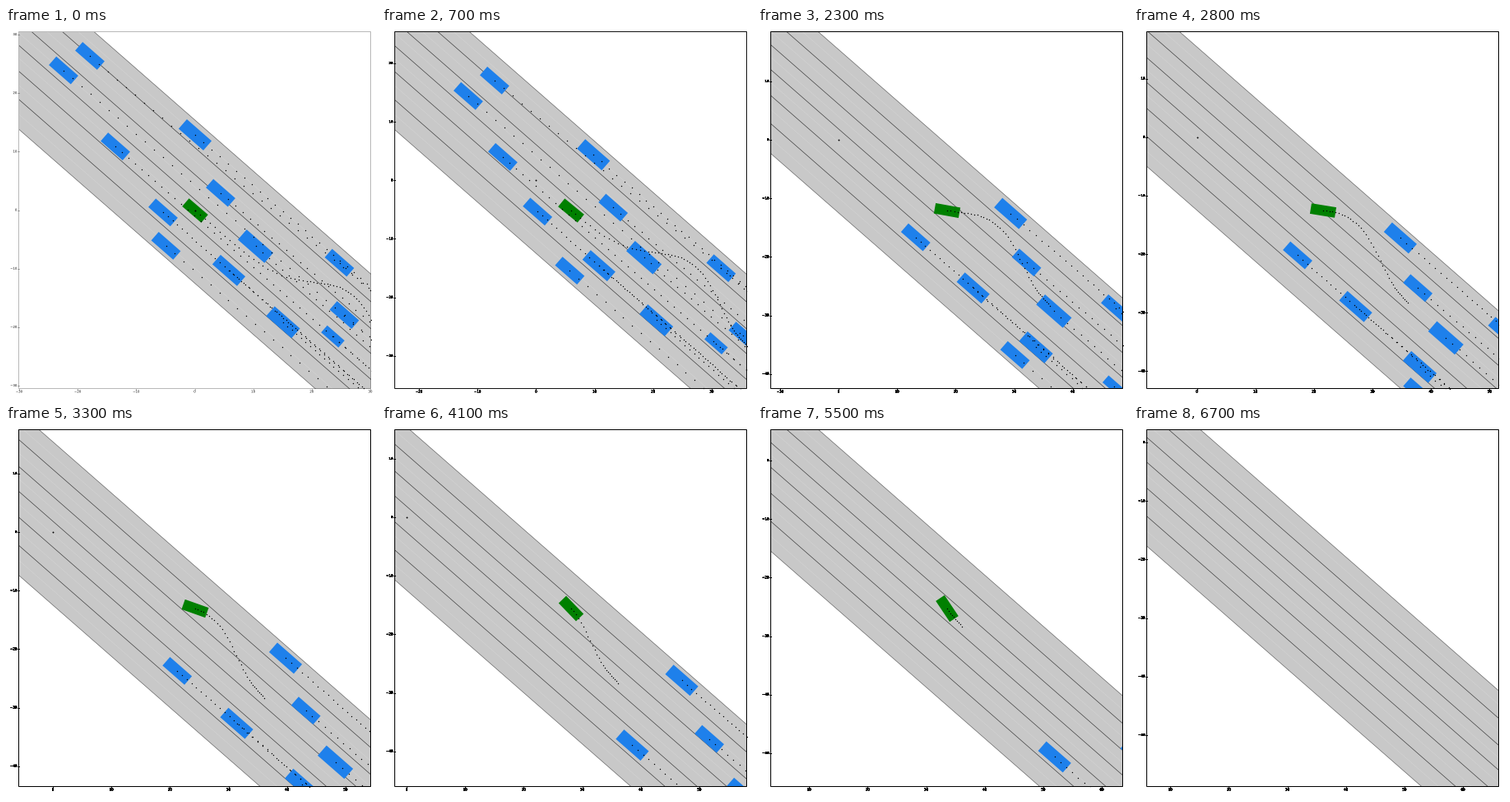
Recreate the animation shown at these times as a matplotlib script. Size 450x450 px, loop 7.2 s.

```python
import numpy as np
import matplotlib.pyplot as plt
import matplotlib.patheffects as pe
from matplotlib.animation import FuncAnimation
from matplotlib.patches import Polygon, Rectangle

SIZE, DPI = 450, 72          # one point equals one pixel
LEFT, TOP, RIGHT, BOTTOM = 15.5, 4.5, 443.5, 438.5
CX, CY = 229.5, 221.5        # the ego car stays here
TEN_M = 71.17                # ten metres in pixels
SLOPE = 0.875                # direction of the road
ROAD_ANGLE = np.degrees(np.arctan(SLOPE))
LAST_MOVE, EGO_GONE, FRAMES = 64, 67, 72

# height of each road line at the world origin
LANES = [-109.8, -76.2, -43.4, -13.2, 18.3, 52.5, 88.8]

# key points of the ego path: the swerve across the lanes and the stop
EGO_STEPS = np.array([0, 8, 15, 19, 23, 28, 33, 41, 55, LAST_MOVE])
EGO_X = np.array([0, 48, 88.5, 111, 131.5, 153, 172.5, 199.5, 238.5, 256.5])
EGO_Y = np.array([0, 41, 71, 81, 85.5, 88.7, 92.5, 110.5, 179.5, 201.5])


def ease(t):
    t = np.clip(t, 0, 1)
    return t * t * (3 - 2 * t)


def smooth(x, xs, ys):
    """Cubic Hermite curve through the key points, clamped at both ends."""
    x = np.clip(x, xs[0], xs[-1])
    m = np.gradient(ys, xs)
    i = np.clip(np.searchsorted(xs, x, side="right") - 1, 0, len(xs) - 2)
    h = xs[i + 1] - xs[i]
    t = (x - xs[i]) / h
    bow = t * (1 - t) * h * (m[i] * (1 - t) - m[i + 1] * t)
    return ys[i] + (ys[i + 1] - ys[i]) * ease(t) + bow


def ego_at(n):
    return smooth(n, EGO_STEPS, EGO_X), smooth(n, EGO_STEPS, EGO_Y)


def ego_heading(n):
    n = min(n, LAST_MOVE)
    (x0, y0), (x1, y1) = ego_at(n - 0.5), ego_at(n + 0.5)
    return np.degrees(np.arctan2(y1 - y0, x1 - x0))


def box(x, y, length, width, angle):
    a = np.radians(angle)
    along = np.array([np.cos(a), np.sin(a)]) * length / 2
    side = np.array([-np.sin(a), np.cos(a)]) * width / 2
    return np.array([x, y]) + [along + side, along - side,
                               -along - side, side - along]


class Car:
    """A car that follows the road, with an optional drift across its lane."""

    def __init__(self, x, offset, speed, accel=0, drift=0, length=35.5,
                 until=LAST_MOVE):
        self.x, self.offset, self.speed = x, offset, speed
        self.accel, self.drift = accel, drift
        self.length, self.width = length, 2 + length / 3
        self.until = until

    def at(self, n):
        x = self.x + self.speed * n + self.accel * n**2
        return x, SLOPE * x + self.offset + self.drift * ease(n / 41)

    def outline(self, n, ox, oy):
        x, y = self.at(n)
        return box(x + ox, y + oy, self.length, self.width, ROAD_ANGLE)


TRAFFIC = [
    Car(-127.5, -76, 11, drift=-16, until=7),
    Car(-159.5, -30.4, 11, until=7),
    Car(-96.5, 7, 8, until=18),
    Car(0.5, -92, 10.26, accel=-0.0515, drift=-2.5, length=40, until=49),
    Car(31.5, -48.5, 9.03, accel=-0.02, drift=-4),
    Car(-38.5, 36.5, 5.75, until=36),
    Car(-35, 74, 10.85),
    Car(74, -20.8, 8.17, length=43),
    Car(176, -90, 7),
    Car(41.5, 37, 4.84, accel=0.0205, length=40, until=61),
    Car(107.5, 42.3, 5.42, accel=0.015, length=41),
    Car(182, -31.7, 10),
    Car(168, 6.7, 7.27, length=28),
]

fig = plt.figure(figsize=(SIZE / DPI, SIZE / DPI), dpi=DPI, facecolor="white")
ax = fig.add_axes([0, 0, 1, 1])
ax.set_xlim(0, SIZE)
ax.set_ylim(SIZE, 0)
ax.axis("off")

window = ax.add_patch(Rectangle((LEFT, TOP), RIGHT - LEFT, BOTTOM - TOP,
                                fill=False, lw=1, snap=False, zorder=8))


def clipped(artist):
    artist.set_clip_path(window)
    return artist


def road_line(color, width=0.65):
    return clipped(ax.plot([], [], color=color, lw=width, zorder=2)[0])


def shape(color, zorder=4):
    return clipped(ax.add_patch(Polygon(np.zeros((4, 2)), fc=color, lw=0,
                                        zorder=zorder)))


def points(size):
    return clipped(ax.plot([], [], "o", color="black", ms=size, mew=0, zorder=6)[0])


def tick_labels(**place):
    return [ax.text(0, 0, "", fontsize=3.9, family="DejaVu Sans", **place)
            for _ in range(8)]


road = shape("#c8c8c8", zorder=1)
lines = [(road_line("#d2d2d2"), (a + b) / 2) for a, b in zip(LANES, LANES[1:])]
lines += [(road_line("#383838"), w) for w in LANES[1:-1]]
lines += [(road_line("#606060"), w) for w in (LANES[0], LANES[-1])]
cars = [shape("#1e80eb") for _ in TRAFFIC]
ego = shape("#008000")
dots, origin = points(1.4), points(1.9)
ticks = ax.plot([], [], color="black", lw=1, zorder=8)[0]
x_labels = tick_labels(ha="center", va="top")
y_labels = tick_labels(ha="right", va="center")


def tick_places(start, low, high, sign):
    """Pixel and text of every ten-metre mark between two limits."""
    marks = [(start + sign * k * TEN_M, k * 10) for k in range(-12, 13)]
    return [(p, str(v).replace("-", "\u2212")) for p, v in marks if low <= p <= high]


def draw_axes(ox, oy, n):
    for label in x_labels + y_labels:
        label.set_text("")
    px, py = [], []
    for label, (p, text) in zip(x_labels, tick_places(ox, LEFT, RIGHT, 1)):
        label.set_position((p, 440.4))
        label.set_text(text)
        px += [p, p, np.nan]
        py += [BOTTOM, BOTTOM + 1.4, np.nan]
    for label, (p, text) in zip(y_labels, tick_places(oy, TOP, BOTTOM, -1)):
        label.set_position((13.4, p))
        label.set_text(text)
        px += [LEFT - 1.4, LEFT, np.nan]
        py += [p, p, np.nan]
    ticks.set_data(px, py)

    # the axes are overdrawn once more per step and so grow darker
    dark = 1 - 0.72 ** (n + 1)
    window.set_edgecolor((0, 0, 0, dark))
    ticks.set_alpha(dark)
    layers = [pe.Normal()] * min(n + 1, 14)
    for label in x_labels + y_labels:
        label.set_path_effects(layers)


def draw_road(ox, oy):
    x = np.array([0, SIZE])
    base = SLOPE * (x - ox) + oy
    for line, w in lines:
        line.set_data(x, base + w)
    road.set_xy(np.column_stack([
        np.r_[x, x[::-1]],
        np.r_[base + LANES[0], base[::-1] + LANES[-1]]]))


def update(n):
    ex, ey = ego_at(n)
    ox, oy = CX - ex, CY - ey
    draw_road(ox, oy)

    # every visible car shows the path it still has to drive
    steps = np.arange(n, LAST_MOVE + 1)
    paths = [ego_at(steps)]
    for patch, car in zip(cars, TRAFFIC):
        shown = n <= car.until
        patch.set_visible(shown)
        if shown:
            patch.set_xy(car.outline(n, ox, oy))
            paths.append(car.at(steps))
    px, py = np.hstack(paths)
    dots.set_data(px + ox, py + oy)
    origin.set_data([ox], [oy])

    ego.set_visible(n < EGO_GONE)
    ego.set_xy(box(CX + 0.5, CY + 0.5, 30.5, 12.8, ego_heading(n)))
    draw_axes(ox, oy, n)
    return []


anim = FuncAnimation(fig, update, frames=FRAMES, interval=100,
                     repeat=True, repeat_delay=0, blit=False)
plt.show()
```
